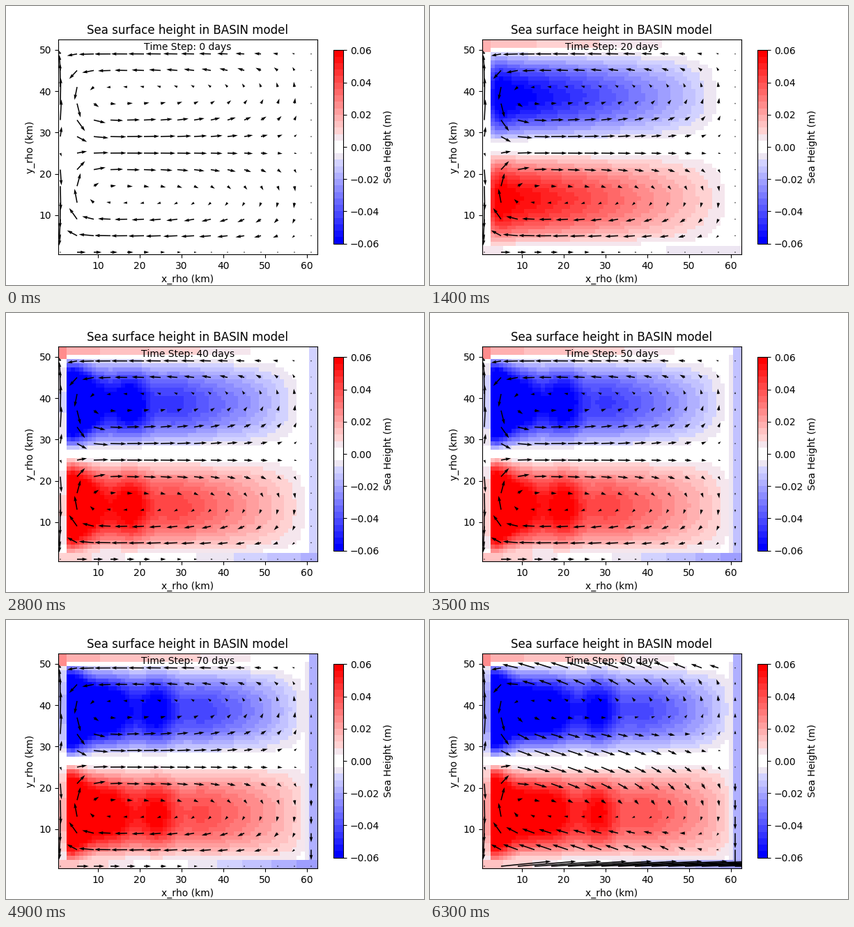
Recreate the animation shown at these times as a matplotlib script. Size 600 px wide and 400 px high, loop 7 s.

```python
import numpy as np
import matplotlib.pyplot as plt
from matplotlib.animation import FuncAnimation
from matplotlib.colors import ListedColormap

plt.rcParams["text.kerning_factor"] = 6

NX, NY, VMAX = 62, 52, 0.06
X, Y = np.meshgrid(np.arange(1, NX + 1), np.arange(1, NY + 1))
QX, QY = np.meshgrid(np.arange(1, NX, 4), np.arange(1, NY, 4))


def ramp(t, start, stop):
    return np.clip((t - start) / (stop - start), 0, 1)


def sea_colors():
    colors = plt.get_cmap("bwr")(np.linspace(0, 1, 30))
    colors[14:16, :3] = 1
    colors[13, :3] = 0.93, 0.90, 0.95
    colors[16, :3] = 0.96, 0.90, 0.93
    return ListedColormap(colors)


def crest(t):
    """Height along the axis of a gyre, by column."""
    if t == 0:
        return 0.0 * X
    # Wind forcing grows until the steady slope limits it
    level = (0.0205 + 0.00017 * t) * (1 - np.exp(-t / 7))
    slope = level * (np.clip(61 - X, 0.01, None) / 18) ** (1 - 0.005 * t)
    forced = 0.0022 * t + 0.00007 * t ** 2
    h = (slope ** -8.0 + forced ** -8.0) ** (-1 / 8)
    h *= 1 - np.exp(-np.clip(X - 1, 0, None) * t / 35)
    h += 0.02 * np.exp(-((X - 4) / 3) ** 2) * ramp(t, 10, 30)

    # Planetary wave travelling east, with a plateau behind it
    d = X - (16 + 0.21 * (t - 30))
    wave = 0.01 * np.cos(np.pi * d / 7) * np.exp(-(d / 8) ** 2)
    plateau = 0.01 / (1 + np.exp((d + 8.5) / 1.5))
    return h + (wave + plateau) * ramp(t, 20, 30)


def arch(low, high):
    return np.clip(np.sin(np.pi * np.clip((Y - low) / (high - low), 0, 1)), 0, 1)


def height(t):
    m = crest(t)
    age = ramp(t, 0, 60)
    flat = 1 - age * (0.45 * ramp(X, 30, 57) + 0.4 * ramp(X, 10, 4))
    south = arch(2, 25.5) ** flat
    north = arch(27.5, 50) ** (1 - 0.4 * age * ramp(X, 10, 4))
    loss = 0.003 * ramp(X, 45, 57) * ramp(t, 0, 10)
    h = m * south - np.clip(1.05 * m - loss, 0, None) * north

    # Western and eastern walls
    west = 0.0003 * max(t - 12, 0)
    h = np.where(X <= 2, west * (south - north), h)
    east = -0.018 * ramp(t, 8, 70)
    h = np.where(X >= 61, east, h)
    h = np.where(X == 60, east * 0.35, h)

    # Southern and northern strips
    strip = ramp(t, 5, 50) * (0.015 - 0.037 * ramp(X, 1, 61))
    h = np.where(Y <= 2, strip, h)
    top = 0.018 * ramp(t, 0, 25) * (1 - ramp(X, 4, 58))
    h = np.where((Y >= 51) & (X < 61), top, h)
    return np.where((Y >= 50) & (X <= 2), 0.027 * ramp(t, 5, 30), h)


def flow(t):
    """Arrow components in pixels."""
    late = ramp(t, 73, 90)
    s = np.clip((QX - 5) / 56, 0, 1)
    near = np.exp(-np.abs(QX - 5) / 3)
    row = 24 * np.cos(np.pi * (np.abs(QY - 27) / 22) ** 1.2)
    gyre = np.sin(np.pi * (QY - 26) / 24) * (QY > 1)

    u = row * (1 - s ** 2.2) * (1 - 0.4 * near)
    v = gyre * (9 * s ** 1.5 - 20 * near)
    v -= late * row / 3 * (1 - ramp(QX, 45, 65)) * (1 - near)
    u[-1] -= late * 10 * s[-1]

    # Southern current, turning into a strong jet
    calm = 14 * np.clip(1 - QX[0] / 45, 0, 1) * (1 + t / 200)
    u[0] = calm + late * (36 + 3.5 * QX[0])
    v[0] = 7 * late

    # Western and eastern walls
    u[:, 0], v[:, 0] = 0.08 * row[:, 0], 37 * gyre[:, 0]
    y = QY[:, 0]
    down = max(t - 40, 0) / 3 * (1.75 - 0.05 * y) * (y > 1)
    u[1:, -1] = 0
    v[:, -1] = np.where(y < 23, -down, 0.07 * t * np.abs(gyre[:, 0]))
    return u, v


fig, ax = plt.subplots(figsize=(6, 4), dpi=100)
mesh = ax.pcolormesh(np.arange(NX + 1) + 0.5, np.arange(NY + 1) + 0.5,
                     height(0), cmap=sea_colors(), vmin=-VMAX, vmax=VMAX)
bar = fig.colorbar(mesh, ax=ax, shrink=0.9, ticks=np.linspace(-VMAX, VMAX, 7))
bar.set_label("Sea Height (m)")
arrows = ax.quiver(QX, QY, *flow(0), scale=1, scale_units="dots")
label = ax.text(0.5, 0.95, "", transform=ax.transAxes, ha="center")
ax.set(xlim=(0.5, NX + 0.5), ylim=(0.5, NY + 0.5),
       xlabel="x_rho (km)", ylabel="y_rho (km)",
       title="Sea surface height in BASIN model")


def draw(i):
    t = 10 * i
    mesh.set_array(height(t))
    arrows.set_UVC(*flow(t))
    label.set_text(f"Time Step: {t} days")
    return mesh, arrows, label


anim = FuncAnimation(fig, draw, frames=10, interval=700, repeat=True,
                     repeat_delay=0)
plt.show()
```
